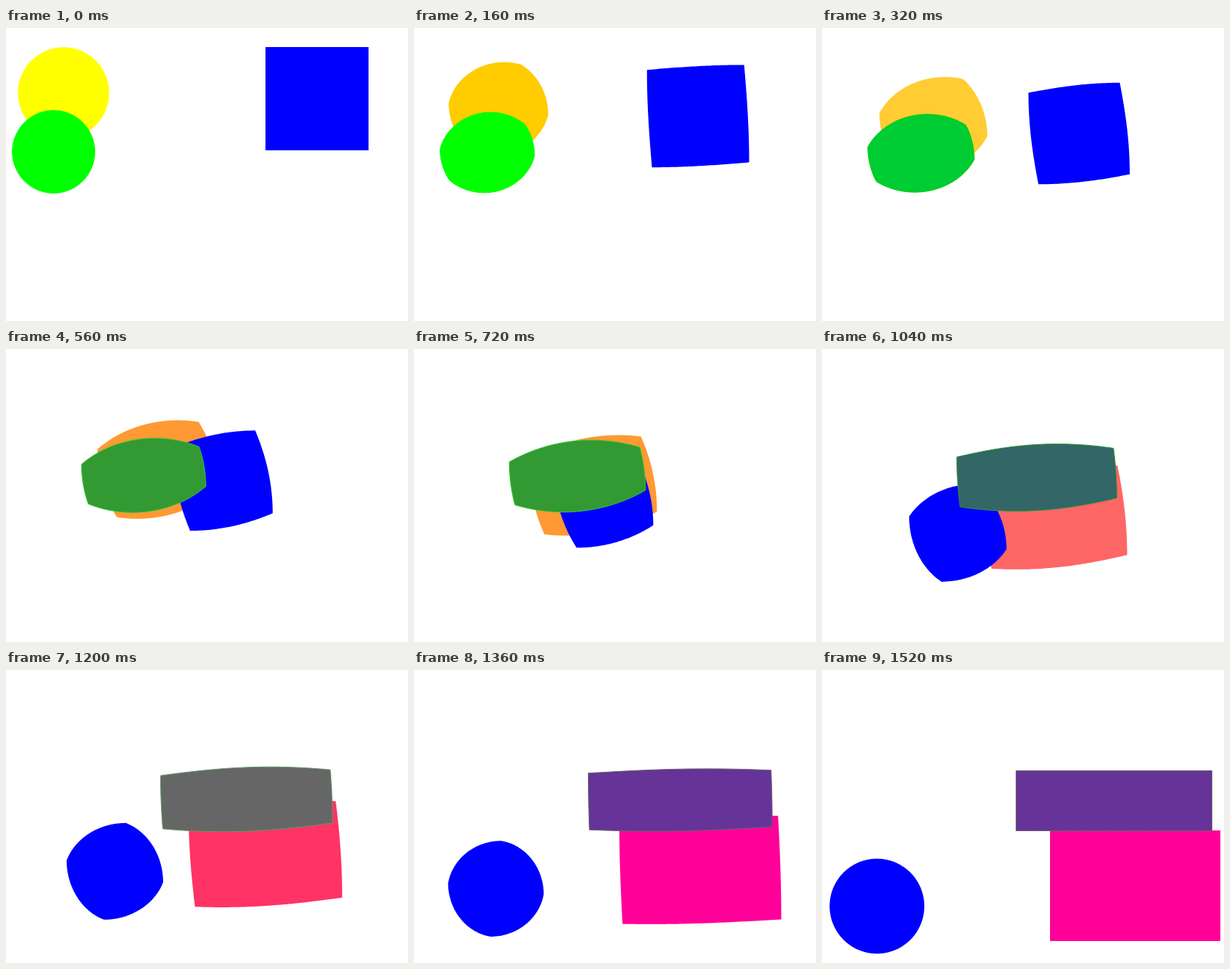
These frames come from a looping animation (550 by 400 pixels, 1600 ms). An HTML page with a canvas:

```html
<!DOCTYPE html>
<html lang="en">
<head>
<meta charset="utf-8">
<title>Shape tween</title>
<style>
  html, body { margin: 0; width: 100%; height: 100%; overflow: hidden; background: #fff; }
  canvas { display: block; }
</style>
</head>
<body>
<canvas id="stage" width="550" height="400"></canvas>
<script>
const ctx = document.getElementById('stage').getContext('2d');
const STEP = 80, STEPS = 20, POINTS = 160;

const circle = (x, y, r) => ({ x, y, r });
const rect = (x, y, w, h) => ({ x, y, w, h });

// Back to front
const shapes = [
  { circle: circle(78.7, 88.7, 62.4), rect: rect(312, 219, 233, 151),
    fill: [[255, 255, 0], [255, 0, 153]] },
  { circle: circle(75.2, 322.4, 64.8), rect: rect(355, 26, 141, 141),
    fill: [[0, 0, 255], [0, 0, 255]], toCircle: true },
  { circle: circle(65.1, 169, 56.4), rect: rect(265.5, 137.5, 268, 82),
    fill: [[0, 255, 0], [102, 51, 153]], stroke: [[0, 255, 0], [102, 102, 102]] }
];

const mix = (a, b, k) => a + (b - a) * k;

// Colours snap to the 216-colour cube
const color = ([from, to], k) =>
  `rgb(${from.map((c, i) => 51 * Math.floor(mix(c, to[i], k) / 51 + 0.45))})`;

// Clockwise from the leftmost point
function onCircle({ x, y, r }, u) {
  const a = Math.PI * (1 + 2 * u);
  return [x + r * Math.cos(a), y + r * Math.sin(a)];
}

// Clockwise from the top left corner, by length along the outline
function onRect({ x, y, w, h }, u) {
  const d = u * 2 * (w + h);
  if (d <= w) return [x + d, y];
  if (d <= w + h) return [x + w, y + d - w];
  if (d <= 2 * w + h) return [x + 2 * w + h - d, y + h];
  return [x, y + 2 * (w + h) - d];
}

// Even samples on each half, with the corners always included
function samples({ w, h }) {
  const corner = w / (w + h) / 2;
  const list = [];
  for (let i = 0; i < POINTS; i++) list.push(i / POINTS);
  list.push(corner, corner + 0.5);
  return list.sort((a, b) => a - b);
}
shapes.forEach(s => { s.samples = samples(s.rect); });

function drawShape(s, k) {
  const square = s.toCircle ? 1 - k : k;
  ctx.beginPath();
  for (const u of s.samples) {
    const [cx, cy] = onCircle(s.circle, u);
    const [rx, ry] = onRect(s.rect, u);
    ctx.lineTo(mix(cx, rx, square), mix(cy, ry, square));
  }
  ctx.closePath();
  ctx.fillStyle = color(s.fill, k);
  ctx.fill();
  if (s.stroke) {
    ctx.lineWidth = 1;
    ctx.strokeStyle = color(s.stroke, k);
    ctx.stroke();
  }
}

function draw(ms) {
  const k = Math.floor(ms / STEP) % STEPS / (STEPS - 1);
  ctx.fillStyle = '#fff';
  ctx.fillRect(0, 0, 550, 400);
  shapes.forEach(s => drawShape(s, k));
}

const start = performance.now();
function tick() {
  draw(performance.now() - start);
  requestAnimationFrame(tick);
}
tick();
</script>
</body>
</html>
```
